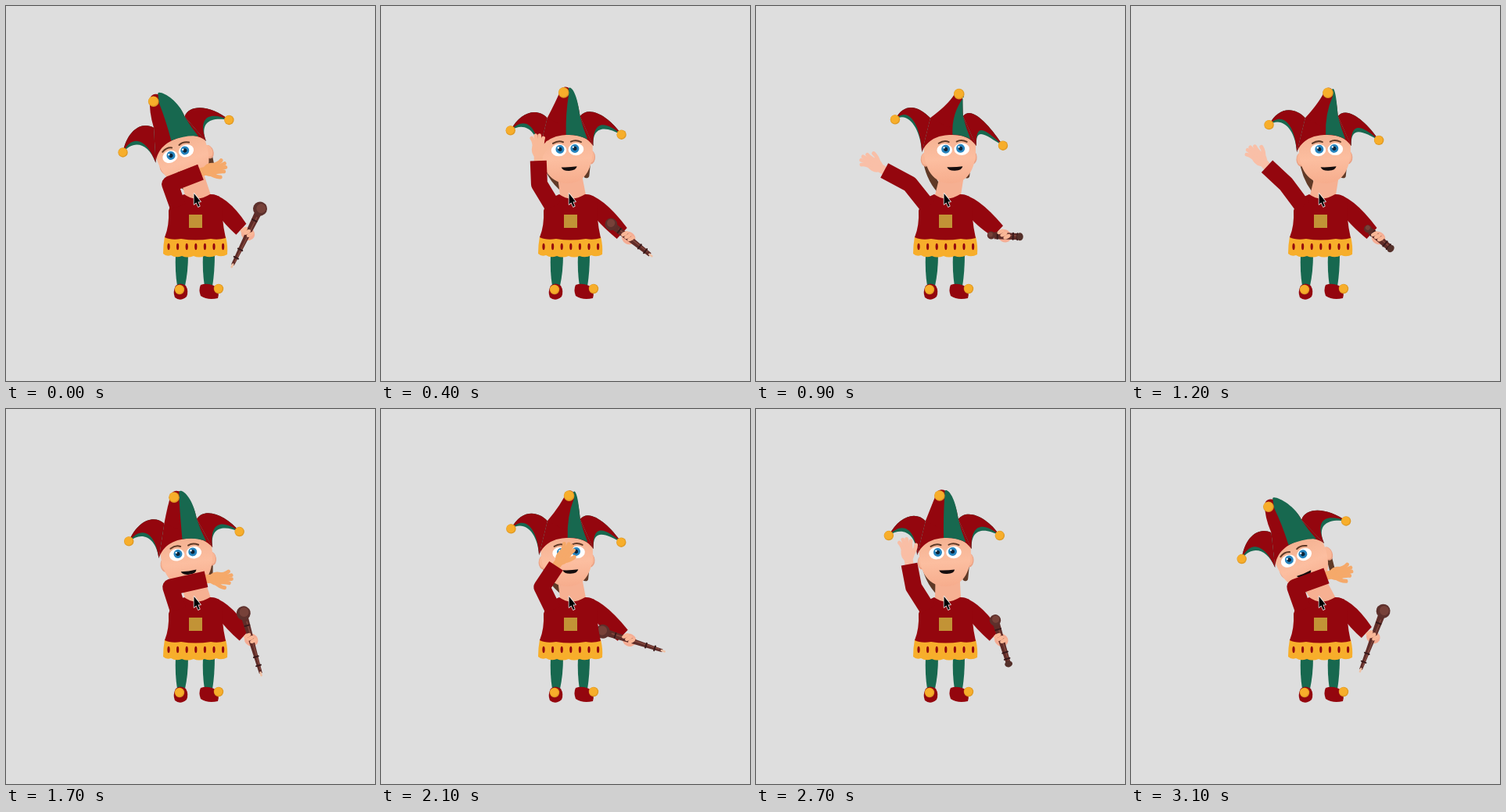
An HTML page with a canvas for the animation above (3200 ms loop, 472x480 px).

```html
<!DOCTYPE html>
<html lang="en">
<head>
<meta charset="utf-8">
<title>Waving jester</title>
<style>
html, body { margin: 0; width: 100%; height: 100%; overflow: hidden; background: #dedede; }
canvas { display: block; width: 100vw; height: 100vh; }
</style>
</head>
<body>
<canvas id="stage" width="472" height="480"></canvas>
<script>
const ctx = document.getElementById('stage').getContext('2d');
const LOOP = 3200, STEP = 100, DEG = Math.PI / 180;
const RED = '#94060e', GREEN = '#17684f', GOLD = '#f7ae2b', SKIN = '#f9b797', HAIR = '#603a27';

// A few key poses; every other joint follows from these four values.
const poses = [
  { time: 0, lean: 225, roll: -17, reach: 249, stick: 116 },
  { time: 700, lean: 245, roll: 13, reach: 172, stick: -5 },
  { time: 1200, lean: 248, roll: 8, reach: 174, stick: 41 },
  { time: 1700, lean: 231, roll: -5, reach: 256, stick: 74 },
  { time: 2100, lean: 238, roll: 7, reach: 224, stick: 18 },
  { time: 2700, lean: 242, roll: 0, reach: 196, stick: 73 },
  { time: 3100, lean: 217, roll: -20, reach: 250, stick: 111 }
];

const clamp = (v, low, high) => Math.max(low, Math.min(high, v));

// Smooth cyclic interpolation between the poses.
function poseAt(time) {
  const n = poses.length;
  const at = i => {
    const turn = Math.floor(i / n), pose = poses[i - turn * n];
    return { ...pose, time: pose.time + turn * LOOP };
  };
  let i = n - 1;
  while (poses[i].time > time) i--;
  const [a, b, c, d] = [-1, 0, 1, 2].map(k => at(i + k));
  const span = c.time - b.time, u = (time - b.time) / span, u2 = u * u, u3 = u2 * u;
  const blend = key => {
    const m0 = (c[key] - a[key]) / (c.time - a.time) * span;
    const m1 = (d[key] - b[key]) / (d.time - b.time) * span;
    return (2 * u3 - 3 * u2 + 1) * b[key] + (u3 - 2 * u2 + u) * m0 +
      (3 * u2 - 2 * u3) * c[key] + (u3 - u2) * m1;
  };
  return { lean: blend('lean'), roll: blend('roll'), reach: blend('reach'), stick: blend('stick') };
}

function fillPath(color, d) {
  ctx.fillStyle = color;
  ctx.fill(new Path2D(d));
}
function strokePath(color, width, d, cap = 'round') {
  ctx.strokeStyle = color;
  ctx.lineWidth = width;
  ctx.lineCap = cap;
  ctx.lineJoin = 'round';
  ctx.stroke(new Path2D(d));
}
function oval(color, x, y, rx, ry = rx, angle = 0) {
  ctx.fillStyle = color;
  ctx.beginPath();
  ctx.ellipse(x, y, rx, ry, angle, 0, 7);
  ctx.fill();
}
function bell([x, y], r = 6.2) {
  oval('#e09a24', x, y, r);
  oval(GOLD, x - .4, y - .5, r - .9);
}
// Returns the point that lies (x, y) from p in a frame turned by angle.
function offset(p, x, y, angle) {
  const cos = Math.cos(angle), sin = Math.sin(angle);
  return [p[0] + x * cos - y * sin, p[1] + x * sin + y * cos];
}

function drawBody() {
  fillPath(GREEN, 'M217 317L233 317Q233 340 229 358L219 358Q216 340 217 317Z');
  fillPath(GREEN, 'M252 317L267 317Q267 340 264 359L254 359Q251 340 252 317Z');
  fillPath(RED, 'M217 358Q223 353 230 358Q234 365 231 372Q223 379 216 373Q213 366 217 358Z');
  fillPath(RED, 'M249 357Q257 354 266 358Q274 365 271 374Q258 377 249 371Q246 363 249 357Z');
  bell([222, 363]);
  bell([272, 362]);
  fillPath(GOLD, 'M203 295L281 295Q284 307 283 318Q276 322 269 319Q262 323 254 320' +
    'Q247 323 240 320Q232 323 225 320Q217 323 211 319Q205 321 201 317Q201 306 203 295Z');
  for (let x = 208; x < 280; x += 11.6) oval(RED, x, 308, 1.6, 4.2);
}

function drawTorso() {
  fillPath(RED, 'M228 241Q243 252 261 241Q274 241 277 250Q275 270 281 297' +
    'Q271 300 262 298Q242 301 224 298Q211 300 203 296Q209 281 208 262Q212 247 228 241Z');
  ctx.fillStyle = '#c29336';
  ctx.fillRect(234, 267, 17, 17);
}

function drawStickArm({ stick, reach }) {
  const angle = stick * DEG;
  const wx = 302 + 6 * Math.cos(angle), wy = 287 + 3 * Math.sin(2 * angle);
  const palm = [wx + 10, wy + 7];
  // The stick points towards the viewer while the other arm is stretched out.
  const length = clamp(40 + (reach - 172) * .9, 40, 83);
  const near = clamp((75 - length) / 30, 0, 1), w = 3 + near;

  fillPath(RED, `M260 241Q282 241 ${wx + 8} ${wy - 6}L${wx - 5} ${wy + 8}Q280 280 272 268Z`);
  oval('#f5ad94', ...palm, 9, 8, .5);
  ctx.save();
  ctx.translate(...offset(palm, -length * .43, 0, angle));
  ctx.rotate(angle);
  fillPath('#5f2c28', `M4 -4.5L${length - 3} ${-2 - 2 * near}L${length - 3} ${2 + 2 * near}L4 4.5Z`);
  strokePath('#84483e', 1.5, `M12 -1L${length - 8} -1`);
  for (const p of [.2, .7, .84]) strokePath('#38191a', 2, `M${length * p} ${-w}L${length * p} ${w}`);
  if (near < .3) strokePath('#efc1a5', 2.5, `M${length - 4} 0L${length} 0`);
  else oval('#54302a', length - 3, 0, 4, 5);
  oval('#5d302c', 0, 0, 9 - 4 * near);
  oval('#774139', -1, -1, 6 - 3 * near);
  ctx.restore();
  for (const s of [-3, 1, 5]) oval(SKIN, palm[0] - 2 + s, palm[1] - 3 + s * .8, 5, 2.5, -.5);
}

function drawFace(center, tilt, turn) {
  ctx.save();
  ctx.translate(...center);
  ctx.rotate(tilt);
  for (const s of [-1, 1]) {
    oval('#eaa184', s * 30 - turn * .5, 11, 6, 9);
    oval(SKIN, s * 30 - turn * .5, 10, 5, 8);
  }
  const shade = ctx.createLinearGradient(0, -20, 0, 44);
  shade.addColorStop(0, '#f4b292');
  shade.addColorStop(.5, '#fcbea0');
  shade.addColorStop(1, '#f6ac8c');
  fillPath(shade, 'M-33 -8C-35 16 -28 43 1 43C26 43 34 16 33 -8Q28 -32 0 -32Q-27 -32 -33 -8Z');
  ctx.translate(turn, -1);
  for (const s of [-1, 1]) {
    oval('#fff', s * 11, 1, 9.8, 7.8);
    oval('#2583bd', s * 9.5, 0, 5.5);
    oval('#0c2438', s * 9.5, 0, 2.6);
    oval('#fff', s * 9.5 - 2, -2, 1.2);
    strokePath(HAIR, 2, `M${s * 5} -9Q${s * 11} -12 ${s * 18} -8`);
  }
  fillPath('#140d0e', 'M-9 23Q1 24 11 23Q10 28 1 28Q-7 28 -9 23Z');
  ctx.restore();
}

function drawHorn(tip, valley, base, side, tilt) {
  const from = (p, x, y) => offset(p, x * side, y, tilt);
  const outer = `M${valley}C${from(valley, 12, -14)} ${from(tip, -14, -24)} ${tip}`;
  const inner = drop => `C${from(tip, -18, -17 + drop)} ${from(base, 0, -34 + drop)} ${base}`;
  fillPath(GREEN, outer + inner(6) + `L${valley}Z`);
  fillPath(RED, outer + inner(-1) + `L${valley}Z`);
}

function drawHat(center, tilt, roll, turn) {
  const local = (x, y) => offset(center, x, y, tilt);
  // The bells swing with the roll of the hat, the brim stays with the face.
  const middle = local(0, -22);
  const [left, right] = [-71, 71].map(x => offset(middle, x, 0, roll * DEG));
  const top = offset(middle, -6 + roll * .5, -51, roll * DEG);
  const brimL = local(-36, 1), brimR = local(34, -3);
  const valleyL = local(-23, -42), valleyR = local(19, -42);

  fillPath(RED, `M${valleyL}L${brimL}C${local(-28, -15)} ${local(-14, -19)} ${local(0, -19)}` +
    `C${local(14, -19)} ${local(26, -16)} ${brimR}L${valleyR}Z`);
  drawHorn(left, valleyL, brimL, -1, tilt);
  drawHorn(right, valleyR, brimR, 1, tilt);

  const near = (x, y) => offset(top, x, y, tilt);
  const width = valleyR[0] - top[0];
  const crest = `${top[0] + width * .8} ${top[1] - 3} ${valleyR}`;
  fillPath(RED, `M${valleyL}Q${near(-10, 10)} ${near(-3, -5)}` +
    `C${near(5, -6 - width * .3)} ${crest}L${local(0, -28)}Z`);
  const seam = local(-1 + turn * 1.3, -19);
  fillPath(GREEN, `M${near(4 + width * .12, -3 - width * .12)}` +
    `C${near(6 + width * .15, -4 - width * .2)} ${crest}Q${local(22, -26)} ${local(27, -12)}` +
    `Q${local(15, -19)} ${seam}Q${local(turn, -46)} ${near(6, 4)}Z`);
  bell(left);
  bell(top, 6.8);
  bell(right);
}

function drawHead({ lean, roll }) {
  const tilt = (Math.min(0, roll) - 3) * DEG, turn = roll * .3;
  const center = [lean, 184 + Math.max(0, -roll) * .2];
  const local = (x, y) => offset(center, x, y, tilt);
  strokePath(HAIR, 9, `M${local(-27 - turn, 8)}Q${local(-25 - turn, 33)} 235 235`);
  strokePath(HAIR, 7, `M${local(28 - turn, 8)}L${local(24 - turn, 34)}`);
  fillPath('#f6b092', `M${local(-14, 30)}L229 242Q244 254 262 242L${local(17, 30)}Z`);
  drawFace(center, tilt, turn);
  drawHat(center, tilt, roll, turn);
}

function drawWavingArm({ reach }) {
  const wrist = [reach, 198 + ((reach - 205) / 11.5) ** 2];
  const elbow = [203 + (reach - 205) * .15, 228];
  const shadow = clamp((reach - 195) / 25, 0, 1);
  const color = `rgb(${249 - 4 * shadow},${191 - 22 * shadow},${167 - 61 * shadow})`;
  ctx.save();
  ctx.translate(...wrist);
  ctx.rotate((-92 + 1.6 * (reach - 200)) * DEG);
  strokePath(color, 11, 'M-4 0L8 0');
  oval(color, 14, 0, 11, 8.5);
  for (let y = -5; y <= 5; y += 3.3) {
    strokePath(color, 4.8, `M14 ${y}Q25 ${y} ${34 - Math.abs(y)} ${y * 1.5 - 1}`);
  }
  strokePath(color, 5, 'M10 4Q17 11 23 12');
  ctx.restore();
  strokePath(RED, 21, `M220 257L${elbow}L${wrist}`, 'butt');
}

function drawPointer() {
  const arrow = 'M240.5 240L240.5 254L243.3 251.5L245.8 257L247.8 256L245.5 250.5L249 250.5Z';
  strokePath('#fff', 1.4, arrow);
  fillPath('#000', arrow);
}

function frame(now) {
  const pose = poseAt(Math.floor(now % LOOP / STEP) * STEP);
  ctx.fillStyle = '#dedede';
  ctx.fillRect(0, 0, 472, 480);
  drawBody();
  drawStickArm(pose);
  drawHead(pose);
  drawTorso();
  drawWavingArm(pose);
  drawPointer();
  requestAnimationFrame(frame);
}
requestAnimationFrame(frame);
</script>
</body>
</html>
```
